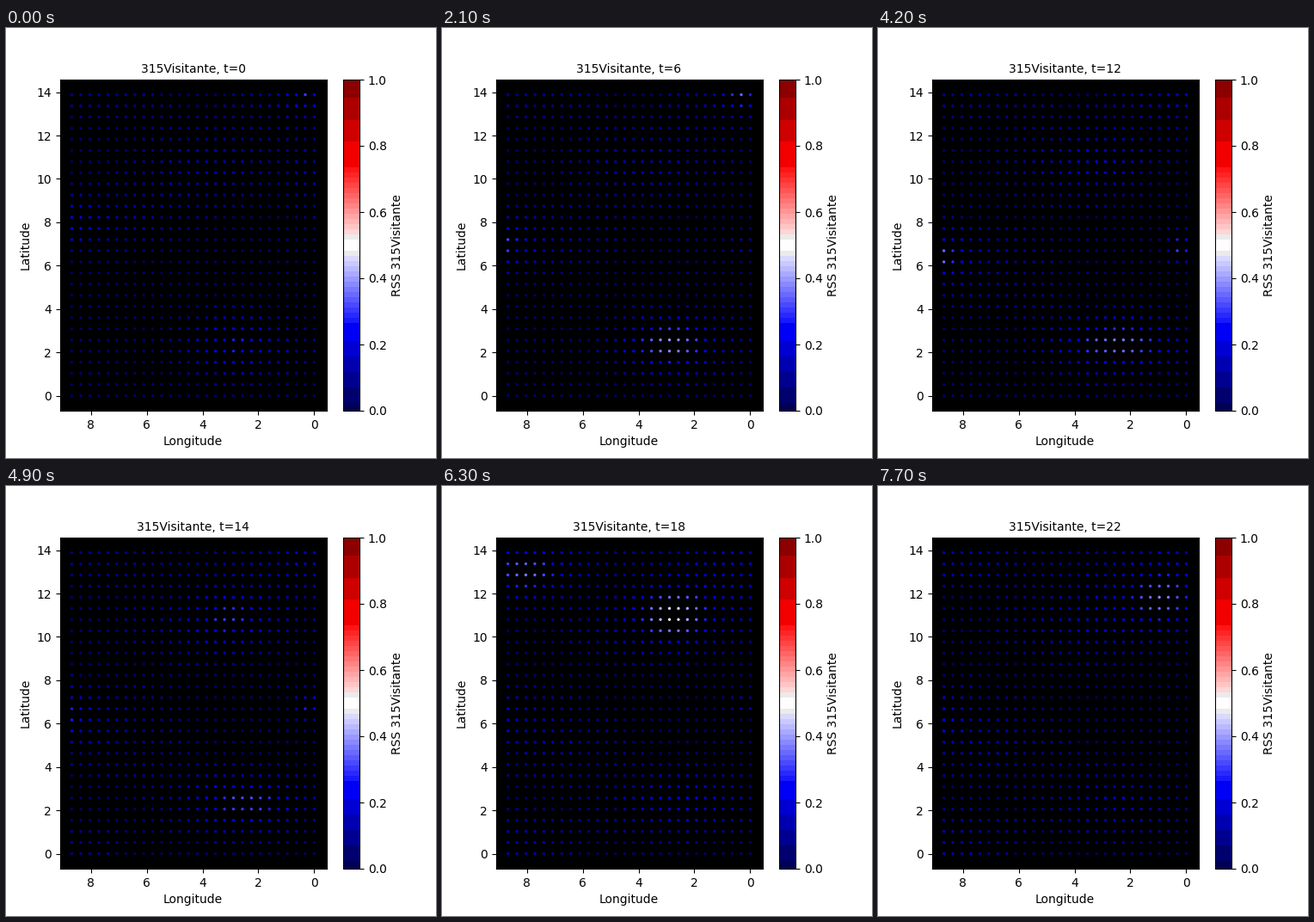
A matplotlib script that plays this animation: 500 px wide and 500 px high, repeating every 8000 ms.

```python
import numpy as np
import matplotlib.pyplot as plt
from matplotlib.animation import FuncAnimation
from matplotlib.colors import ListedColormap

NAME = "315Visitante"
TICK, HOLD, LOOP, LAST = 50, 350, 8000, 22
LON, LAT, N = 8.68, 13.885, 28

lon, lat = (g.ravel() for g in np.meshgrid(np.linspace(0, LON, N),
                                           np.linspace(0, LAT, N)))


def bump(x, y, w, h):
    return np.exp(-(((lon - x) / w) ** 2 + ((lat - y) / h) ** 2) / 2)


def pulse(t, peak, width):
    return np.exp(-((t - peak) / width) ** 2)


def ease(t, start, end):
    u = np.clip((t - start) / (end - start), 0, 1)
    return u * u * (3 - 2 * u)


def south(t):
    spread = ease(t, 5, 11)
    core = bump(2.9 - .5 * spread, 2.4, 1 + .45 * spread, .8)
    return .29 * pulse(t, 8, 10) * core + .1 * bump(2.6, 2.3, 2, 1.3)


def north(t):
    move = ease(t, 17, 22)
    core = bump(3 - 2.2 * move, 10.9 + .8 * move, .8, .85)
    halo = bump(1.2, 11.8, 1.8, 1.3)
    return (.29 * pulse(t, 18.5, 5.5) * core + .12 * ease(t, 10, 18) * halo
            + .12 * bump(3.9, 10.6, 2, 1.3))


def corners(t):
    right = .23 * pulse(t, 4, 7) * bump(.35, 13.8, .4, .45)
    left = .26 * pulse(t, 18, 2.5) * bump(8.1, 12.8, 1.1, .8)
    top = (.06 + .05 * ease(t, 12, 18)) * bump(8, 13.6, 2.5, .8)
    return right + left + top + .11 * bump(.4, 13.6, 1.6, .9)


def west(t):
    y = 7.8 - 1.4 * ease(t, 0, 10)
    core = .07 + .16 * pulse(t, 10, 5) + .08 * ease(t, 18, 22)
    halo = .15 * (1 - .6 * ease(t, 8, 18))
    low = .12 * ease(t, 10, 18) * bump(8.4, .5, 1.5, 1)
    return (core * bump(8.8, y, .5, .8) + halo * bump(8.7, y + .3, 2.6, 1)
            + low + .1 * ease(t, 2, 22) * bump(7.2, 4.8, 2, 1.2))


def east(t):
    return (.31 * pulse(t, 12, 6) * bump(.2, 6.9, .35, .5)
            + .1 * (1 - ease(t, 0, 8)) * bump(.3, 10, .4, 1.6))


def signal(t):
    return .03 + south(t) + north(t) + corners(t) + west(t) + east(t)


def banded_seismic():
    # Coarse steps in the dark ends, fine steps around white
    edges = np.r_[0, 1.5:15:3, 17:32, 33:48, 52:61:4.25, 64] / 64
    band = np.searchsorted(edges, np.arange(256) / 256, side="right") - 1
    mid = (edges[band] + edges[band + 1]) / 2
    colors = plt.get_cmap("seismic")(mid)
    off_white = (abs(mid - .5) > .01) & (abs(mid - .5) < .03)
    colors[off_white, :3] = .92
    return ListedColormap(colors)


fig, ax = plt.subplots(figsize=(5, 5), dpi=100)
ax.set_facecolor("black")
dots = ax.scatter(lon, lat, c=signal(0), s=2, cmap=banded_seismic(),
                  vmin=0, vmax=1)
ax.set_xlim(LON * 1.05, -LON * .05)
ax.set_ylim(-LAT * .05, LAT * 1.05)
ax.set_xlabel("Longitude")
ax.set_ylabel("Latitude")
title = ax.set_title(f"{NAME}, t=0", fontsize=10)
fig.colorbar(dots, ax=ax, label=f"RSS {NAME}")


def update(i):
    t = min(i * TICK // HOLD, LAST)
    dots.set_array(signal(t))
    title.set_text(f"{NAME}, t={t}")
    return dots, title


anim = FuncAnimation(fig, update, frames=LOOP // TICK, interval=TICK,
                     repeat=True, repeat_delay=0)
plt.show()
```
